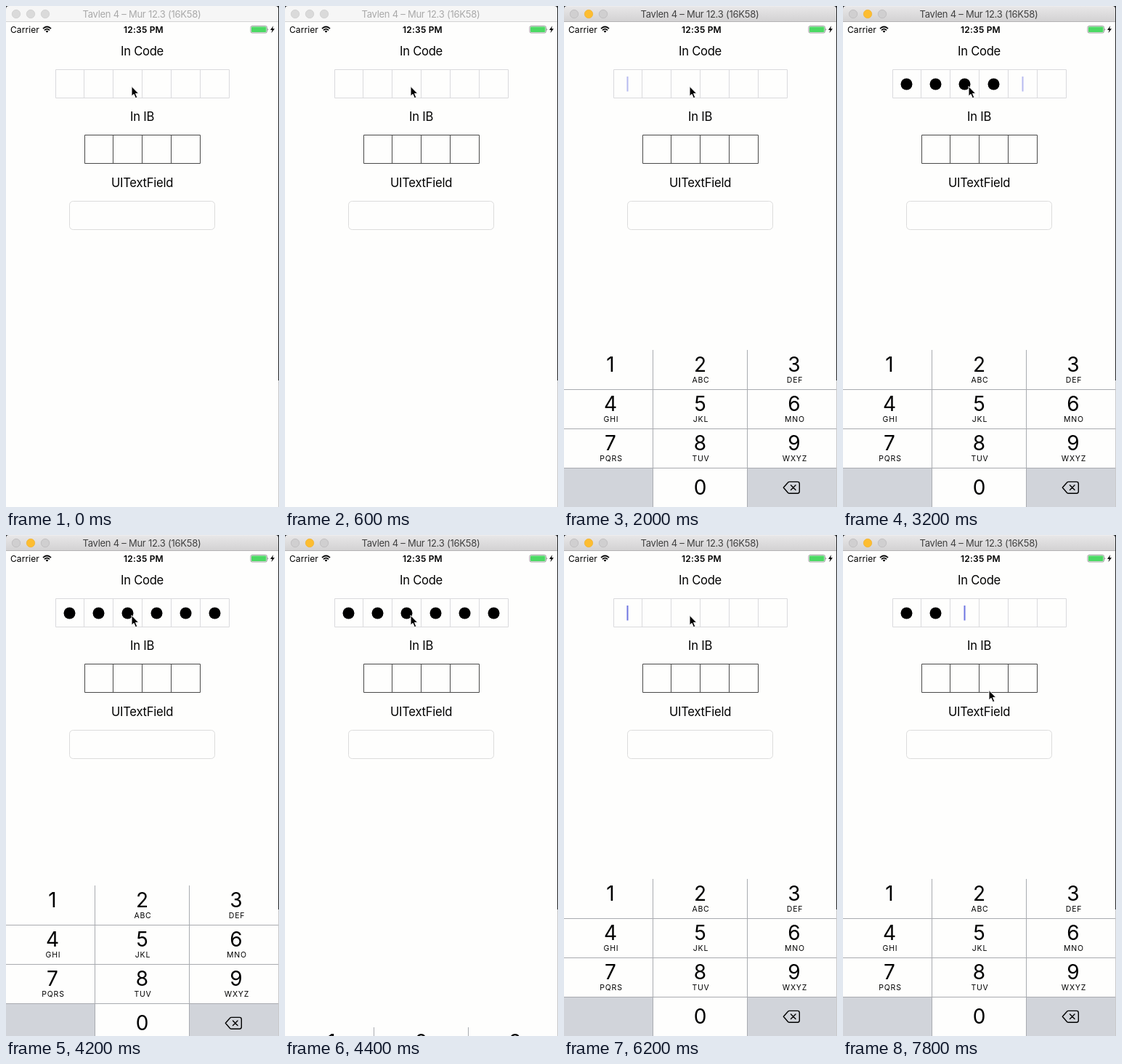
These frames come from a looping animation (376 by 689 pixels, 8 s). An HTML page:

```html
<!DOCTYPE html>
<html lang="en">
<head>
<meta charset="utf-8">
<title>Passcode fields</title>
<style>
  html, body { margin: 0; height: 100%; overflow: hidden; background: #fefefd; }
  svg { display: block; width: 100%; height: 100%; }
  text { font-family: Inter, Roboto, sans-serif; fill: #000; text-anchor: middle; }
  .title { font-size: 13px; letter-spacing: -.25px; }
  .status { font-size: 12px; }
  .label { font-size: 16.6px; letter-spacing: -.25px; }
  .digit { font-size: 28px; }
  .letters { font-size: 10.5px; letter-spacing: .8px; }
  .line { fill: none; stroke-width: 1; }
</style>
</head>
<body>
<svg viewBox="0 0 376 689" preserveAspectRatio="none">
  <defs>
    <linearGradient id="chrome" x2="0" y2="1">
      <stop stop-color="#f2f1f2"/><stop offset=".06" stop-color="#e7e6e7"/><stop offset="1" stop-color="#d2d1d2"/>
    </linearGradient>
  </defs>
  <rect width="376" height="689" fill="#fefefd"/>
  <rect width="376" height="8" fill="#252729"/>
  <path id="bar" d="M0 22V4Q0 0 4 0H371Q375 0 375 4V22Z"/>
  <path id="rule" class="line" d="M0 21.5H375"/>
  <g id="lights"></g>
  <text id="title" class="title" x="187" y="16">Tavlen 4 – Mur 12.3 (16K58)</text>

  <text class="status" x="6" y="36.5" style="text-anchor:start" letter-spacing=".1">Carrier</text>
  <g fill="none" stroke="#000" stroke-width="1.7">
    <path d="M51 31.2Q56.5 25.8 62 31.2M53 33.4Q56.5 30 60 33.4"/>
    <path d="M54.6 34.6Q56.5 33 58.4 34.6L56.5 36.7Z" fill="#000" stroke="none"/>
  </g>
  <text class="status" x="189.5" y="36.5" font-weight="600" letter-spacing=".2">12:35 PM</text>
  <rect x="337" y="27.5" width="22.5" height="9.5" rx="2" fill="#fff" stroke="#858585" stroke-width=".8"/>
  <rect x="338" y="28.5" width="20.5" height="7.5" rx="1" fill="#4cd964"/>
  <path d="M360.6 30.7Q362 32.2 360.6 33.9Z" fill="#333"/>
  <path d="M368.3 27.2L364 33H366.7L365.4 37.2L370 31.3H367.2Z"/>

  <text class="label" x="187.5" y="68">In Code</text>
  <text class="label" x="187.5" y="158">In IB</text>
  <text class="label" x="187.5" y="248.5">UITextField</text>
  <path id="codeGrid" class="line" stroke="#dadadd"/>
  <path id="ibGrid" class="line" stroke="#4a4a4a"/>
  <rect class="line" x="87.5" y="268.5" width="200" height="39" rx="5" stroke="#dcdcdc"/>
  <g id="dots"></g>
  <rect id="caret" y="97" width="2" height="20.5" fill="#2832d4"/>

  <g id="keyboard">
    <rect y="473" width="375" height="216" fill="#fefefd"/>
    <path d="M0 635H122V689H0ZM253 635H375V689H253Z" fill="#d1d4da"/>
    <path class="line" stroke="#a9abb0" d="M122.5 473V689M252.5 473V689M0 527.5H375M0 581.5H375M0 635.5H375"/>
    <g id="keys"></g>
    <path class="line" stroke="#000" style="stroke-width:1.4" stroke-linejoin="round" stroke-linecap="round"
      d="M302.3 662.3L308.3 655.5Q309.2 654.4 310.6 654.4H321.6Q324.3 654.4 324.3 657.1V667.6Q324.3 670.3 321.6 670.3H310.6Q309.2 670.3 308.3 669.2ZM312.5 659L319 665.6M319 659L312.5 665.6"/>
  </g>

  <rect x="375" y="5" width="1" height="510" fill="#252729"/>
  <rect x="375" y="515" width="1" height="174" fill="#c9c9cb"/>
  <path id="pointer" d="M0 0V13.6L3.1 10.8L5.4 16.2L7.8 15.2L5.5 9.9H9.8Z" stroke="#fff" stroke-width="1"/>
</svg>
<script>
const LOOP = 8000, STEP = 200, KEYBOARD_HEIGHT = 216;
const ACTIVATE = 1400, BLINK = 600;
const COLUMNS = [64, 187.5, 317];
const LETTERS = ['', 'ABC', 'DEF', 'GHI', 'JKL', 'MNO', 'PQRS', 'TUV', 'WXYZ'];
// [time, entered digits, start of caret blinking or null]
const ENTRY = [
  [0, 0, null], [1600, 0, 1600], [2400, 1, 1600], [2600, 2, 1600],
  [2800, 3, 1600], [3200, 4, 1600], [3600, 5, 1600], [4200, 6, null],
  [5200, 0, 5200], [6600, 1, 5200], [7000, 2, 5200]
];
// [time, shown]
const SLIDES = [[-1000, 0], [1600, 1], [4185, 0], [5200, 1]];

const $ = id => document.getElementById(id);
function add(parent, tag, attrs, text = '') {
  const node = document.createElementNS(parent.namespaceURI, tag);
  for (const name in attrs) node.setAttribute(name, attrs[name]);
  node.textContent = text;
  parent.append(node);
  return node;
}
const latest = (table, t) => table.findLast(row => row[0] <= t);

function grid(x, y, count) {
  let d = `M${x + .5} ${y}H${x + 40 * count - .5}V${y + 39}H${x + .5}Z`;
  for (let i = 1; i < count; i++) d += `M${x + 40 * i - .5} ${y}v39`;
  return d;
}
$('codeGrid').setAttribute('d', grid(68, 87.5, 6));
$('ibGrid').setAttribute('d', grid(108, 177.5, 4));

const lights = [14, 34, 54].map(cx =>
  add($('lights'), 'circle', { cx, cy: 11, r: 5.7, 'stroke-width': .7 }));
const dots = Array.from({ length: 6 }, (_, i) =>
  add($('dots'), 'circle', { cx: 87.5 + 40 * i, cy: 107.5, r: 8 }));

LETTERS.forEach((letters, i) => {
  const x = COLUMNS[i % 3], y = 503 + 54 * Math.floor(i / 3);
  add($('keys'), 'text', { class: 'digit', x, y }, i + 1);
  add($('keys'), 'text', { class: 'letters', x: x + 1, y: y + 15 }, letters);
});
add($('keys'), 'text', { class: 'digit', x: COLUMNS[1], y: 672 }, 0);

function paintChrome(active) {
  $('bar').setAttribute('fill', active ? 'url(#chrome)' : '#f6f6f6');
  $('rule').setAttribute('stroke', active ? '#b4b3b4' : '#d3d3d3');
  $('title').style.fill = active ? '#404040' : '#a9a9a9';
  lights.forEach((light, i) => {
    const amber = active && i === 1;
    light.setAttribute('fill', amber ? '#fdbd30' : active ? '#d0cfd0' : '#dadada');
    light.setAttribute('stroke', amber ? '#f0b02c' : active ? '#b9b8b9' : '#cbcbcb');
  });
}

function keyboardOffset(t) {
  const [start, shown] = latest(SLIDES, t);
  const k = (t - start) / 47;
  const remaining = (1 + k) * Math.exp(-k);
  return KEYBOARD_HEIGHT * (shown ? remaining : 1 - remaining);
}

function draw(t) {
  paintChrome(t >= ACTIVATE);

  const [, count, blinkStart] = latest(ENTRY, t);
  dots.forEach((dot, i) => dot.setAttribute('visibility', i < count ? 'visible' : 'hidden'));
  const phase = (t - blinkStart) % (2 * BLINK);
  $('caret').setAttribute('x', 86.5 + 40 * count);
  $('caret').setAttribute('opacity', blinkStart === null ? 0 : Math.abs(1 - phase / BLINK));

  // Whole pixels keep the key borders sharp.
  $('keyboard').setAttribute('transform', `translate(0 ${Math.round(keyboardOffset(t))})`);

  const p = Math.min(1, Math.max(0, (t - 7000) / 500));
  const move = p * p * (3 - 2 * p);
  $('pointer').setAttribute('transform', `translate(${173 + 28 * move} ${110.5 + 103 * move})`);
}

const origin = performance.now();
function tick(now) {
  const t = Math.max(0, now - origin) % LOOP;
  draw(Math.floor(t / STEP) * STEP);
  requestAnimationFrame(tick);
}
draw(0);
requestAnimationFrame(tick);
</script>
</body>
</html>
```
